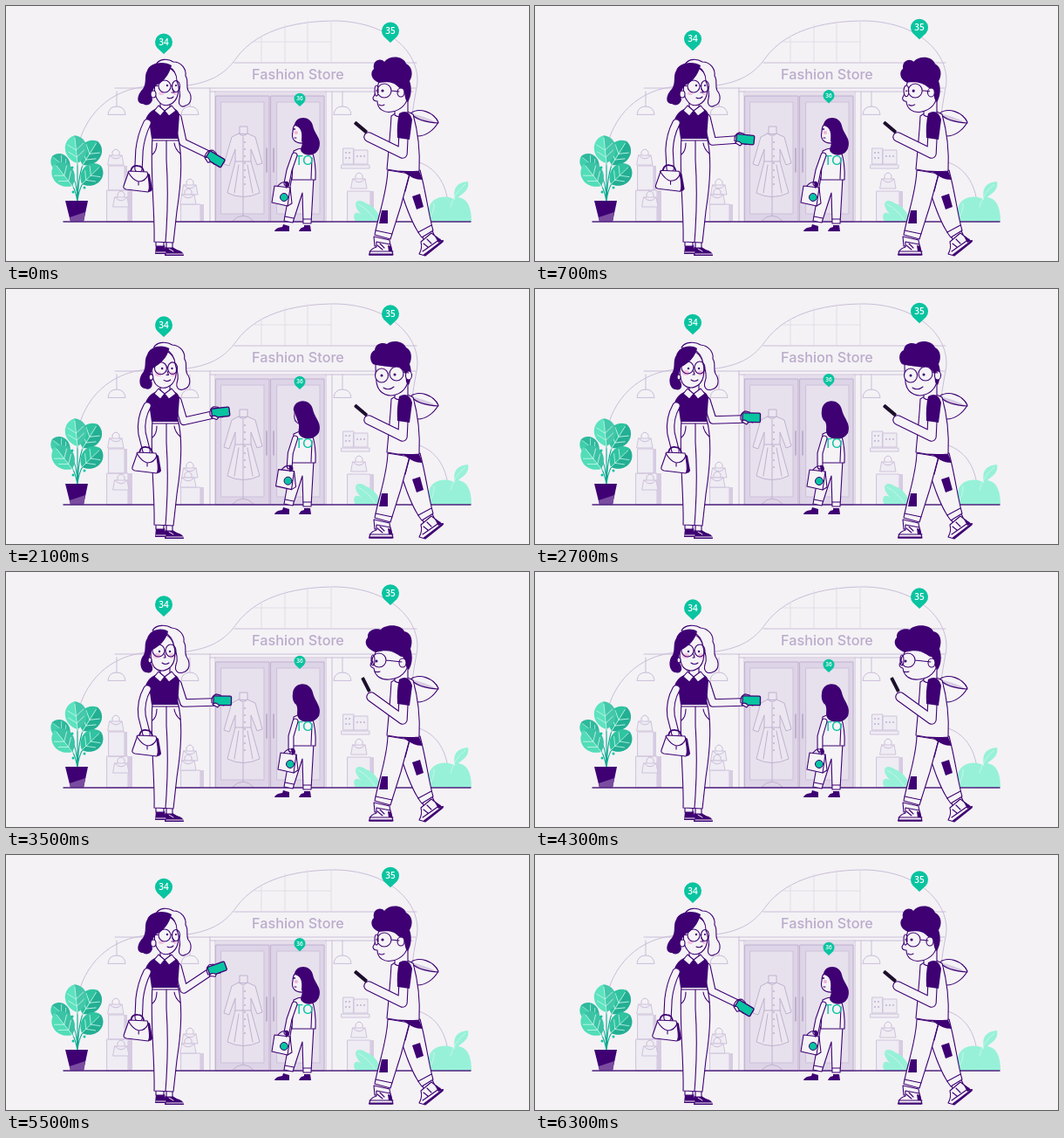
Write an HTML page that moves like this. It is 600x292 px and loops after 6.4 s.

```html
<!DOCTYPE html>
<html lang="en">
<head>
<meta charset="utf-8">
<title>Fashion store</title>
<style>
  html, body { margin: 0; width: 100%; height: 100%; overflow: hidden; background: #f4f2f5; }
  svg { display: block; width: 100vw; height: 100vh; }
  path, rect, circle, ellipse { stroke-linejoin: round; stroke-linecap: round; }
  .line { fill: none; stroke: #3e0073; stroke-width: 1.1; }
  .body { fill: #f5f3f6; stroke: #3e0073; stroke-width: 1.1; }
  .dark { fill: #3e0073; }
  .teal { fill: #08c4a0; }
  .mint { fill: #97f1d8; }
  .pale { fill: none; stroke: #cabdd8; stroke-width: 1; }
  .faint { fill: none; stroke: #e2dce8; stroke-width: 1; }
  .box { fill: #efecf3; stroke: #cfc3dc; }
  .shade { fill: #d6cbe1; }
  .rim { fill: none; stroke: #3e0073; }
  .skin { fill: none; stroke: #f5f3f6; }
  text { text-anchor: middle; }
  .pin text { fill: #fff; font: 600 10px "Open Sans", sans-serif; }
  .sign { fill: #bbabcc; font: 500 16.200px Inter, sans-serif; }
</style>
</head>
<body>
<svg viewBox="0 0 600 292" preserveAspectRatio="none">
  <defs>
    <g id="lamp"><path class="pale" d="M0 98V115M-10 124Q-9 115 0 115Q9 115 10 124Z"/></g>
    <g id="purse">
      <path class="pale" d="M-4 0V-4Q0 -10 4 -4V0"/>
      <path class="box" d="M-7 0H7L9 11H-9Z"/><path class="pale" d="M-7 0Q0 8 7 0"/>
    </g>
    <path id="drop" class="teal" d="M0 14L-7.5 7A10 10 0 1 1 7.5 7Z"/>
    <g id="leaf">
      <path d="M0 0C-17 -7 -16 -29 0 -32C16 -29 17 -7 0 0Z"/>
      <path d="M0 0C17 -7 16 -29 0 -32Z" fill="#067d72" opacity=".28"/>
      <path d="M0 2V-29M0 -7L-9 -14M0 -7L9 -14M0 -15L-9 -22M0 -15L9 -22" stroke="#c6f5e9" stroke-width=".8" fill="none"/>
    </g>
  </defs>

  <!-- shop -->
  <path class="pale" d="M82 165C88 128 118 94 165 92C230 96 251 78 264 60C290 24 340 17 379 17C446 19 478 60 471 94C465 126 460 158 474 179C488 184 503 196 507 224"/>
  <path class="faint" d="M293 34V64M320 22V64M346 17V64M373 17V64M285 41H373"/>
  <path class="pale" d="M262 65H471M125 94H470M234 98H467M234 94V247M240 98V247M367 98V247M374 98V247"/>
  <text class="sign" x="335" y="84">Fashion Store</text>
  <use href="#lamp" x="127"/><use href="#lamp" x="211"/><use href="#lamp" x="386"/>
  <rect x="240" y="99" width="127" height="148" fill="#e5deeb"/>
  <path fill="#ded4e7" stroke="#c0b0cf" d="M241 103H302V247H241ZM304 103H365V247H304Z"/>
  <path fill="#e7e1ed" stroke="#cdc1d9" d="M247 110H296V238H247ZM311 110H360V238H311Z"/>
  <path stroke="#b5a3c6" stroke-width="1.500" d="M299 163V190M307 163V190"/>
  <g fill="#ebe6f0" stroke="#c0b1cf">
    <path fill="none" d="M272 218V240M260 246Q272 234 284 246Z"/>
    <path d="M268 146V138H277V146Z"/>
    <path d="M267 146L259 150L250 181L256 183L263 164V178L254 214Q272 223 291 214L281 178V164L288 182L294 180L286 150L277 146Q272 151 267 146Z"/>
    <path fill="none" d="M263 178H281M272 150V218M267 182L262 214M277 182L283 214"/>
    <path fill="none" stroke-width="2" stroke-dasharray="0 8" d="M274 156V212"/>
  </g>
  <path class="box" d="M118 183H136V211H118ZM116 211H140V247H116ZM201 227H223V247H201ZM385 182H417V186H385ZM392 212H418V247H392ZM387 163H399V181H387ZM399 165H415V181H399Z"/>
  <path class="shade" d="M136 183H139V211H136ZM140 211H145V247H140ZM223 227H227V247H223ZM418 212H422V247H418Z"/>
  <path fill="none" stroke="#c1b1d0" stroke-width="2" stroke-dasharray="0 4" d="M390 168H397M390 174H397M403 172H412"/>
  <use href="#purse" x="126" y="171"/><use href="#purse" x="132" y="219"/>
  <use href="#purse" x="211" y="205"/><use href="#purse" x="209" y="216"/><use href="#purse" x="405" y="198"/>

  <!-- plants -->
  <path class="mint" d="M401 247C396 238 402 234 408 239C396 228 401 218 413 226C422 229 428 237 431 247ZM470 247C474 236 481 230 485 233C487 217 508 216 515 222C512 208 518 202 530 201C532 210 525 214 519 219Q534 221 534 247Z"/>
  <path fill="none" stroke="#c6f5e9" d="M424 246Q416 233 404 227M485 245Q492 234 491 226M510 230Q514 214 527 204"/>
  <path class="line" style="stroke:#08a98f" d="M82 224V180M82 224Q83 196 88 182M82 224Q82 200 72 186M82 224Q80 212 76 205M82 224Q83 212 88 203"/>
  <use href="#leaf" fill="#2fc3a0" transform="translate(88 182) rotate(32)"/>
  <use href="#leaf" fill="#3ecfac" transform="translate(73 188) rotate(-52) scale(.8)"/>
  <use href="#leaf" fill="#5ce3bf" transform="translate(82 180) rotate(-6)"/>
  <use href="#leaf" fill="#52ddb8" transform="translate(76 206) rotate(-38)"/>
  <use href="#leaf" fill="#2fc3a0" transform="translate(87 204) rotate(46) scale(.95)"/>
  <g class="teal"><circle cx="76" cy="185" r="1.500"/><circle cx="77" cy="213" r="1.500"/><circle cx="90" cy="208" r="1.500"/></g>
  <path class="dark" d="M68 223H94L89 247H74Z"/>
  <path fill="#7a4ca0" d="M73 242L91 236L89 247H74Z"/>
  <path class="line" style="stroke:#4f207f;stroke-width:1.500" d="M66 247H533"/>

  <!-- shopper -->
  <path class="body" d="M328 196H353L350 249H341L340 214L329 248L319 246Z"/>
  <path class="line" d="M320 241L330 243M341 244H350"/>
  <path class="dark" d="M318 250L325 252L325 258H308Q309 254 317 253ZM342 251H349L350 258H336Q337 254 342 253Z"/>
  <path class="body" d="M330 166Q340 160 351 166Q356 180 355 199H328Z"/>
  <path class="line" d="M351 174L350 198"/>
  <path id="girlFace" class="body"/>
  <g id="girlEye"><circle class="dark" cx="331" cy="141" r="1"/><circle cx="333" cy="145" r="2" fill="#f0b3d4"/><path class="line" d="M331 151L333 151"/></g>
  <path id="girlHair" class="dark"/>
  <text x="342" y="182" class="teal" style="font:15px Lato,sans-serif">TO</text>
  <g class="limb" id="girlArm" data-width="7"></g>
  <g id="shopBag">
    <path class="line" d="M-6 -10Q2 -20 7 -11"/>
    <path class="body" d="M-9 -11L9 -9L6 12L-12 8Z"/>
    <path class="line" d="M9 -9L11 9L6 12"/>
    <circle class="teal" cx="2" cy="2" r="4.500" stroke="#3e0073"/>
    <path class="dark" d="M3 -16Q8 -17 8 -11L4 -8Z"/>
  </g>

  <!-- woman -->
  <path class="dark" d="M172 274H182L184 284H171ZM183 276H191L196 279Q204 281 204 286H182Z"/>
  <path d="M172 282H183M184 284H203M187 278L192 281" stroke="#f5f3f6"/>
  <path class="body" d="M172 269V275H181V269ZM184 270V277H191V270Z"/>
  <path class="body" d="M168 150L197 149C203 171 201 203 196 235L192 271L170 270C171 235 165 190 168 150Z"/>
  <path class="line" d="M168 154H198M184 154V176Q187 220 183 270M173 157Q173 166 168 170M193 157Q194 164 200 169"/>
  <path class="body" d="M177 106V119Q182 125 188 118V106Z"/>
  <g class="limb" id="armRight" data-width="9.500"></g>
  <path class="dark" d="M173 117Q181 122 191 117Q197 118 199 124L197 152H167L165 138L159 136Q160 122 173 117Z"/>
  <path class="body" d="M175 114L170 120L177 126L182 120ZM190 114L195 120L187 126L182 120Z"/>
  <g id="phone"><path class="body" d="M-12 3Q-13 -5 -7 -7L-2 -6L2 6Z"/><rect class="teal" x="-10" y="-5" width="20.500" height="10.500" rx="1.500" stroke="#3e0073" stroke-width="1.300"/><path class="body" d="M-11 5Q-8 1 -3 6L-5 8Z"/></g>
  <g class="limb" id="armLeft" data-width="9.500"></g>
  <g id="purseBig">
    <path class="line" style="stroke-width:1.800" d="M-8 -9Q-8 -19 0 -18Q7 -18 7 -9"/>
    <path class="dark" d="M10 -11L14 -8L17 9Q16 12 12 12Z"/>
    <path class="body" d="M-10 -12L11 -11Q15 8 12 12L-13 9Q-17 8 -16 5Z"/>
    <path class="line" d="M-11 -11Q-5 -1 1 0Q9 0 12 -8M1 0V4"/>
  </g>
  <path id="face" class="body"/>
  <path id="blonde" class="body"/>
  <path id="brown" class="dark"/>
  <path id="ear" class="body"/>
  <path id="blush" fill="#f1c3df"/>
  <path id="glasses" class="line"/>
  <path id="eyes" class="dark"/>
  <path id="smile" class="line"/>

  <!-- man -->
  <path class="body" d="M477 262L488 255L492 264L481 272ZM422 264L440 268L441 275H423Z"/>
  <path class="body" d="M451 188H475C482 214 485 240 490 257L477 265C465 250 457 225 451 205Z"/>
  <path class="body" d="M438 188C437 214 428 236 423 262L441 267L453 229L463 192Z"/>
  <path class="line" d="M424 257L443 261M473 259L488 251M463 193L458 212"/>
  <path class="dark" d="M431 234H438V249H428ZM466 218L475 215L479 230L471 233ZM455 189L474 189L478 199Q466 199 455 189Z"/>
  <path class="body" d="M425 270L441 273L444 285H417Q417 278 425 276ZM476 270L488 260L501 270L481 286L474 284Q478 277 476 270Z"/>
  <path class="line" style="stroke-width:2.200" d="M417 284.500H443M480 285L501 269"/>
  <path class="line" d="M417 281H444M426 274L432 279M429 272L434 277M478 281L498 267M479 272L484 276M483 267L488 272"/>
  <path class="dark" d="M438 274L442 275L443 281H439ZM491 262L500 269L496 271Z"/>
  <path class="body" d="M464 123C474 115 491 122 496 133C491 142 482 149 472 149L468 141Z"/>
  <path class="shade" d="M464 123Q469 134 495 134Q480 126 464 123Z"/>
  <path class="line" d="M464 123Q474 133 496 134"/>
  <path class="body" d="M442 126Q455 116 467 124C473 145 475 170 474 189Q455 191 437 187C439 165 441 145 442 126Z"/>
  <path class="body" d="M446 112V125Q453 130 461 122V105Z"/>
  <path id="manFace" class="body"/>
  <path id="manHair" class="dark"/>
  <path id="manEar" class="body"/>
  <path id="manGlasses" class="body"/>
  <path id="manEyes" class="dark"/>
  <path id="manSmile" class="line"/>
  <g id="mobile"><rect x="-2" y="-9" width="4" height="18" rx="1" fill="#1d0f2c"/></g>
  <g class="limb" id="manArm" data-width="11.500"></g>
  <path class="dark" d="M451 123Q462 117 466 130L463 153L449 151Q448 135 451 123Z"/>

  <g class="pin" data-x="181" data-y="41"></g>
  <g class="pin" data-x="441" data-y="28"></g>
  <g class="pin" data-x="337" data-y="106" data-size=".65"></g>
</svg>
<script>
const LOOP = 6400, STEP = 100;
const find = s => document.querySelector(s);

// Timelines: [time, pose index]
const lines = {
  look: [[0, 0], [1500, 0], [2500, 1], [4400, 1], [5400, 0], [LOOP, 0]],
  purse: [[0, 0], [300, 0], [1300, 1], [4400, 1], [5600, 0], [LOOP, 0]],
  reach: [[0, 0], [200, 0], [1200, 1], [1500, 1], [2500, 2], [4400, 2], [5300, 1], [5500, 1], [6300, 0], [LOOP, 0]],
  head: [[0, 0], [500, 0], [1300, 1], [2700, 1], [3400, 2], [4400, 2], [5300, 0], [LOOP, 0]],
  tap: [[0, 0], [600, 0], [1400, 1], [2200, 0], [2700, 0], [3400, 2], [4400, 2], [5300, 0], [LOOP, 0]]
};

const oval = (x, y, rx, ry = rx) =>
  `M${x - rx} ${y}a${rx} ${ry} 0 1 0 ${2 * rx} 0a${rx} ${ry} 0 1 0 ${-2 * rx} 0Z`;
const place = (x, y, turn = 0) => `translate(${x} ${y}) rotate(${turn})`;

// id, attribute, timeline, poses
const movers = [
  ['girlFace', 'd', 'look', ['M339 133C330 133 329 139 329 144C327 152 331 158 342 157Z', 'M339 133C334 133 332 140 332 145C332 150 335 153 341 154Z']],
  ['girlEye', 'opacity', 'look', ['1', '0']],
  ['girlHair', 'd', 'look', [
    'M331 137C331 126 349 124 352 137C354 147 363 152 359 163C356 171 346 173 340 168C335 164 342 160 339 154C340 146 339 138 331 137Z',
    'M329 139C330 125 349 125 352 138C354 148 363 154 359 165C354 173 342 174 336 168C332 163 336 158 333 152C330 150 328 145 329 139Z']],
  ['girlArm', 'd', 'look', ['M331 171L325 188L322 203', 'M332 171L327 188L327 203']],
  ['shopBag', 'transform', 'look', [place(317, 217), place(324, 218)]],

  ['armLeft', 'd', 'purse', ['M162 134Q155 148 153 165L152 186', 'M162 134Q154 148 156 165L161 185']],
  ['purseBig', 'transform', 'purse', [place(151, 201), place(161, 199)]],
  ['armRight', 'd', 'reach', ['M197 128L203 156L232 170', 'M197 128L204 154L231 136', 'M197 128L204 150L238 149']],
  ['phone', 'transform', 'reach', [place(240, 175, 31), place(242, 130, -20), place(248, 147, 1)]],
  ['face', 'd', 'look', [
    'M172 82C169 92 170 103 175 109C182 118 194 113 197 102C201 86 196 74 185 70Z',
    'M167 82C165 92 166 103 170 109C178 117 190 112 193 101C196 86 191 74 180 70Z']],
  ['blonde', 'd', 'look', [
    'M172 67C176 60 186 60 192 64C202 64 207 73 206 80C210 86 206 91 209 97C214 103 213 112 206 114C201 117 197 113 199 106C201 99 198 92 196 86C196 78 192 72 186 69Z',
    'M168 67C172 60 184 60 190 64C200 65 205 73 204 80C208 86 204 91 207 97C212 104 211 113 203 115C197 117 193 113 195 106C198 99 195 92 193 86C192 78 188 72 182 69Z']],
  ['brown', 'd', 'look', [
    'M190 68C182 63 165 64 162 74C158 80 162 88 157 95C150 102 149 112 157 112C161 115 167 113 168 107C166 101 168 96 172 91C180 87 187 80 190 68Z',
    'M186 68C178 63 165 66 162 76C158 82 161 88 158 95C152 102 154 114 161 115C167 117 170 112 167 106C164 100 165 94 168 89C175 86 184 78 186 68Z']],
  ['ear', 'd', 'look', [oval(169, 101, 3, 4), oval(165, 101, 2, 3)]],
  ['blush', 'd', 'look', [oval(178, 100, 3, 2) + oval(194, 100, 2, 2), oval(173, 96, 4, 3) + oval(190, 96, 3, 3)]],
  ['glasses', 'd', 'look', [
    oval(182, 92, 7) + oval(195, 92, 4.5, 6.5) + 'M189 91L191 91M175 91L170 92',
    oval(175, 90, 7) + oval(189, 90, 6, 7) + 'M182 89L183 89M168 88L166 89']],
  ['eyes', 'd', 'look', [oval(185, 91, 1.2) + oval(195, 91, 1.1), oval(176, 91, 1.2) + oval(188, 91, 1.2)]],
  ['smile', 'd', 'look', ['M185 105Q189 107 192 104M191 95L193 99L190 99', 'M179 104Q183 107 187 104M182 94L183 98L181 98']],

  ['manFace', 'd', 'head', [
    'M429 82C427 89 426 98 421 105C421 108 424 109 426 109C426 118 434 123 443 121C454 119 460 112 462 101L458 82Z',
    'M424 82C424 91 424 99 425 106C425 109 426 110 426 111C429 120 439 124 447 121C457 118 461 110 462 101L458 80Z',
    'M426 86C424 92 422 99 418 106C418 109 421 110 422 110C423 119 430 124 440 123C453 122 461 114 462 102L456 82Z']],
  ['manHair', 'd', 'head', [
    'M428 88C419 85 417 76 422 72C420 62 430 59 434 64C440 56 456 57 459 66C467 70 467 80 463 86C466 94 465 104 461 110C456 106 459 100 455 95C449 96 450 84 428 88Z',
    'M421 86C416 80 418 72 423 70C424 62 432 61 437 63C442 58 456 59 459 67C466 70 466 80 463 86C466 94 465 104 462 110C457 108 460 100 457 95C453 88 434 90 421 86Z',
    'M424 92C413 88 410 80 415 75C414 65 426 64 430 66C436 59 454 60 457 68C466 70 467 80 464 88C467 97 466 106 462 112C457 108 459 102 455 97C450 98 446 86 424 92Z']],
  ['manEar', 'd', 'head', [oval(453, 99, 4, 5), oval(462, 99, 3.5, 5), oval(455, 104, 4, 5)]],
  ['manGlasses', 'd', 'head', [
    oval(434, 97, 8) + oval(425, 97, 2, 6) + 'M442 97L451 98',
    oval(448, 97, 8) + oval(431, 99, 7.5, 8) + 'M456 95L462 96',
    oval(428, 101, 8) + oval(421, 101, 2, 6) + 'M436 101L454 103']],
  ['manEyes', 'd', 'head', [oval(432, 97, 1.6) + oval(425, 97, .8), oval(446, 98, 1.5) + oval(431, 99, 1.5), oval(425, 102, 1.5) + oval(421, 103, .8)]],
  ['manSmile', 'd', 'head', ['M428 113Q431 115 434 113', 'M433 113Q439 117 445 112', 'M423 114Q426 115 429 114']],
  ['manArm', 'd', 'tap', ['M456 148L455 169L416 150', 'M456 148L455 169L417 148', 'M456 148L455 169L419 143']],
  ['mobile', 'transform', 'tap', [place(407, 139, -50), place(409, 136, -40), place(413, 129, -27)]]
].map(([id, attr, line, poses]) => {
  const node = find('#' + id);
  const width = +node.dataset.width;
  if (width) node.innerHTML = `<path class="rim" stroke-width="${width}"/><path class="skin" stroke-width="${width - 2.2}"/>`;
  return { nodes: width ? [...node.children] : [node], attr, line: lines[line], poses };
});

const pins = [...document.querySelectorAll('.pin')];
pins.forEach((pin, i) => {
  pin.innerHTML = `<use href="#drop"/><text y="3.600">${34 + i}</text>`;
});

// Blend every number in two strings of the same structure.
function blend(a, b, k) {
  const number = /-?\d*\.?\d+/g, ends = b.match(number);
  let i = 0;
  return a.replace(number, n => ' ' + +(+n + (ends[i++] - n) * k).toFixed(2));
}

function draw(t) {
  for (const { nodes, attr, line, poses } of movers) {
    const i = line.findIndex(key => key[0] > t);
    const [start, from] = line[i - 1], [end, to] = line[i];
    const k = (t - start) / (end - start);
    const value = blend(poses[from], poses[to], k * k * (3 - 2 * k));
    nodes.forEach(node => node.setAttribute(attr, value));
  }
  const lift = 2.5 * (1 - Math.cos(t / LOOP * 6 * Math.PI));
  for (const pin of pins) {
    const { x, y, size = 1 } = pin.dataset;
    pin.setAttribute('transform', `translate(${x} ${y - lift}) scale(${size})`);
  }
}

const begin = performance.now();
function tick() {
  const t = (performance.now() - begin) % LOOP;
  draw(Math.floor(t / STEP) * STEP);
  requestAnimationFrame(tick);
}
tick();
</script>
</body>
</html>
```
